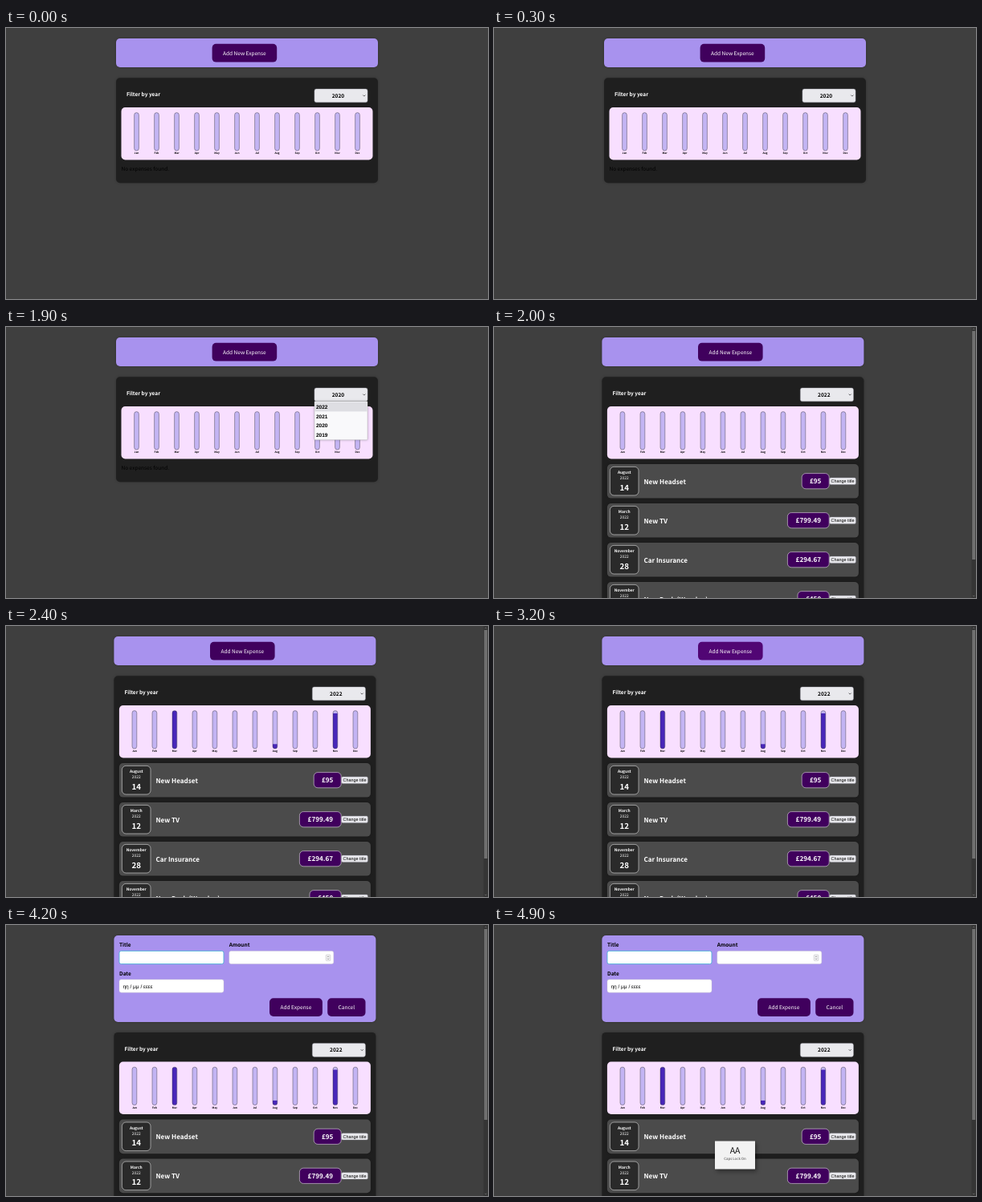
Recreate the animation shown at these times as an HTML page. Size 600x338 px, loop 5 s.

```html
<!DOCTYPE html>
<html lang="en">
<head>
<meta charset="utf-8">
<title>Expense tracker</title>
<style>
html, body { margin: 0; width: 100%; height: 100%; overflow: hidden; background: #3f3f3f; }
svg { display: block; width: 600px; height: 338px; }
text { font-family: 'Noto Sans CJK JP', 'Noto Sans JP', 'Noto Sans', sans-serif; white-space: pre; text-rendering: geometricPrecision; }
.b { font-weight: 700; }
.m { text-anchor: middle; }
.w { fill: #fff; }
.a { font-family: 'Liberation Sans', Arial, sans-serif; }
.card { filter: drop-shadow(0 .4px 1.6px rgba(0, 0, 0, .25)); }
.pop { filter: drop-shadow(2.5px 3px 2.5px rgba(0, 0, 0, .4)); }
</style>
</head>
<body>
<svg id="stage" viewBox="0 0 600 338"></svg>
<script>
const LOOP = 5000;
const OPEN = 1100, HOVER_2021 = 1500, HOVER_2022 = 1600, PICK = 2000;
const HOVER_ADD = 2800, FORM = 3300, FOCUS = 3800, CAPS = 4600;
const GROW = 300, FORM_SHIFT = 71.6;
const PURPLE = '#40005d';
const MONTHS = 'Jan Feb Mar Apr May Jun Jul Aug Sep Oct Nov Dec'.split(' ');
const FILLS = { Mar: 1, Aug: 0.12, Nov: 0.93 };
// month, day, title, price, width of the price badge
const ITEMS = [
  ['August', 14, 'New Headset', '£95', 34],
  ['March', 12, 'New TV', '£799.49', 51.8],
  ['November', 28, 'Car Insurance', '£294.67', 51.8],
  ['November', 28, 'New Desk (Wooden)', '£450', 39.2]
];

const rect = (x, y, w, h, r, fill, more = '') =>
  `<rect x="${x}" y="${y}" width="${w}" height="${h}" rx="${r}" fill="${fill}" ${more}/>`;
const text = (x, y, size, str, cls = '', fill = '') =>
  `<text x="${x}" y="${y}" font-size="${size}" class="${cls}" ${fill && `fill="${fill}"`}>${str}</text>`;
const line = (d, color, width = 0.6) =>
  `<path d="${d}" fill="none" stroke="${color}" stroke-width="${width}"/>`;
const stroke = (color, width = 0.41) => `stroke="${color}" stroke-width="${width}"`;
const group = (x, y, body) => `<g transform="translate(${x} ${y})">${body}</g>`;

const button = (x, y, w, label, fill = PURPLE) =>
  rect(x, y, w, 22.8, 4.9, fill) + text(x + w / 2, y + 13.8, 6.52, label, 'm w');

const addPanel = hovered =>
  rect(137, 13, 326, 36, 4.9, '#a892ee', 'class="card"') +
  button(256.6, 19.8, 80.6, 'Add New Expense', hovered ? '#510674' : PURPLE);

function field(x, y, label, focused) {
  const edge = focused ? stroke('#4fb3d9', 0.9) : stroke('#ccc');
  return text(x, y, 6.52, label, 'b') + rect(x, y + 5.4, 130, 16.2, 2.4, '#fff', edge);
}

function form(focused) {
  return rect(137, 13, 326, 108, 4.9, '#a892ee', 'class="card"') +
    field(143.6, 27, 'Title', focused) +
    field(280.4, 27, 'Amount') +
    rect(400.8, 37, 5.8, 7.6, 1, '#eeeef0', stroke('#b5b5bb')) +
    line('M402.7 39.9l1-1 1 1M402.7 41.8l1 1 1-1', '#555', 0.5) +
    field(143.6, 62.6, 'Date') +
    text(148, 78.8, 6.52, 'ηη / μμ / εεεε', 'a') +
    button(330.6, 91.2, 65.9, 'Add Expense') +
    button(402.8, 91.2, 47.3, 'Cancel');
}

function chart(grow) {
  return rect(143.5, 99, 313, 65.4, 4.9, '#f8dfff') + MONTHS.map((name, i) => {
    const x = 162.5 + i * 25, h = 47.4 * (FILLS[name] || 0) * grow;
    return `<clipPath id="c${i}">${rect(x - 2.9, 105.6, 5.8, 47.4, 2.9, '#000')}</clipPath>` +
      rect(x - 2.9, 105.6, 5.8, 47.4, 2.9, '#c3b4f3') +
      rect(x - 2.9, 153 - h, 5.8, h, 0, '#4826b9', `clip-path="url(#c${i})"`) +
      rect(x - 2.9, 105.6, 5.8, 47.4, 2.9, 'none', stroke('#313131')) +
      text(x, 157.1, 3.26, name, 'b m');
  }).join('');
}

const item = ([month, day, title, price, w], i) => group(0, 171 + i * 49,
  rect(143.5, 0, 313, 42.6, 4.9, '#4b4b4b', 'class="card"') +
  rect(147, 3.4, 35.6, 35.6, 4.9, '#2a2a2a', stroke('#fff', 0.5)) +
  text(164.8, 12.2, 4.89, month, 'b m w') +
  text(164.8, 19.3, 4.89, '2022', 'm w') +
  text(164.8, 32.5, 9.78, day, 'b m w') +
  text(189, 24.6, 8.15, title, 'b w') +
  rect(419.8 - w, 11.6, w, 19.2, 4.9, PURPLE, stroke('#fff', 0.5)) +
  text(419.8 - w / 2, 24.4, 8.15, price, 'b m w') +
  rect(420.2, 17.1, 32.8, 8.3, 1.6, '#e9e9ed', stroke('#8f8f9d')) +
  text(436.6, 23.2, 5.43, 'Change title', 'a m'));

const expenses = (picked, grow) =>
  rect(137, 62.3, 326, picked ? 320 : 130.9, 4.9, '#1f1f1f', 'class="card"') +
  text(150, 85, 6.52, 'Filter by year', 'b w') +
  rect(383.9, 76, 66.2, 16.8, 2.4, '#e9e9ed', stroke('#8f8f9d')) +
  text(413.4, 86.8, 6.52, picked ? 2022 : 2020, 'b m') +
  line('M444.3 83.6l1.5 1.5 1.5-1.5', '#000') +
  chart(grow) +
  (picked ? ITEMS.map(item).join('') : text(143.5, 178.3, 6.52, 'No expenses found.'));

const menu = active =>
  rect(384, 92.8, 66, 48, 0.8, '#f9f9fb', stroke('#aaa') + ' class="card"') +
  [2022, 2021, 2020, 2019].map((year, i) => {
    const y = 93.8 + i * 11.6;
    return (year === active ? rect(384.3, y, 65.4, 11.6, 0, '#dedee3') : '') +
      text(386, y + 8.1, 6.52, year, 'a b');
  }).join('');

const scrollbar = thumb =>
  rect(594.4, 0, 5.6, 338, 0, '#353535') +
  rect(595.2, 5, 4, thumb, 0, '#707070') +
  line('M596 3.2l1.2-1.2 1.2 1.2M596 334.8l1.2 1.2 1.2-1.2', '#999', 0.5);

const capsNotice = () =>
  rect(275, 269.5, 50, 35, 0, '#f2f2f2', 'class="pop"') +
  text(300, 284.6, 10.5, 'AA', 'm', '#111') +
  text(300, 292.7, 4.4, 'Caps Lock On', 'm', '#444');

function scene(t) {
  const picked = t >= PICK, formOpen = t >= FORM;
  const p = Math.min(1, Math.max(0, (t - PICK) / GROW));
  const grow = 1 - (1 - p) ** 2;
  let out = group(picked ? -2.6 : 0, 0,
    (formOpen ? form(t >= FOCUS) : addPanel(t >= HOVER_ADD)) +
    group(0, formOpen ? FORM_SHIFT : 0, expenses(picked, grow)));
  if (t >= OPEN && !picked) out += menu(t < HOVER_2021 ? 2020 : t < HOVER_2022 ? 2021 : 2022);
  if (picked) out += scrollbar(formOpen ? 238 : 285);
  if (t >= CAPS) out += capsNotice();
  return out;
}

const stage = document.getElementById('stage');
const start = performance.now();
let shown = '';
function draw() {
  const t = Math.floor((performance.now() - start) % LOOP / 100) * 100;
  const next = scene(t);
  if (next !== shown) stage.innerHTML = shown = next;
  requestAnimationFrame(draw);
}
draw();
</script>
</body>
</html>
```
